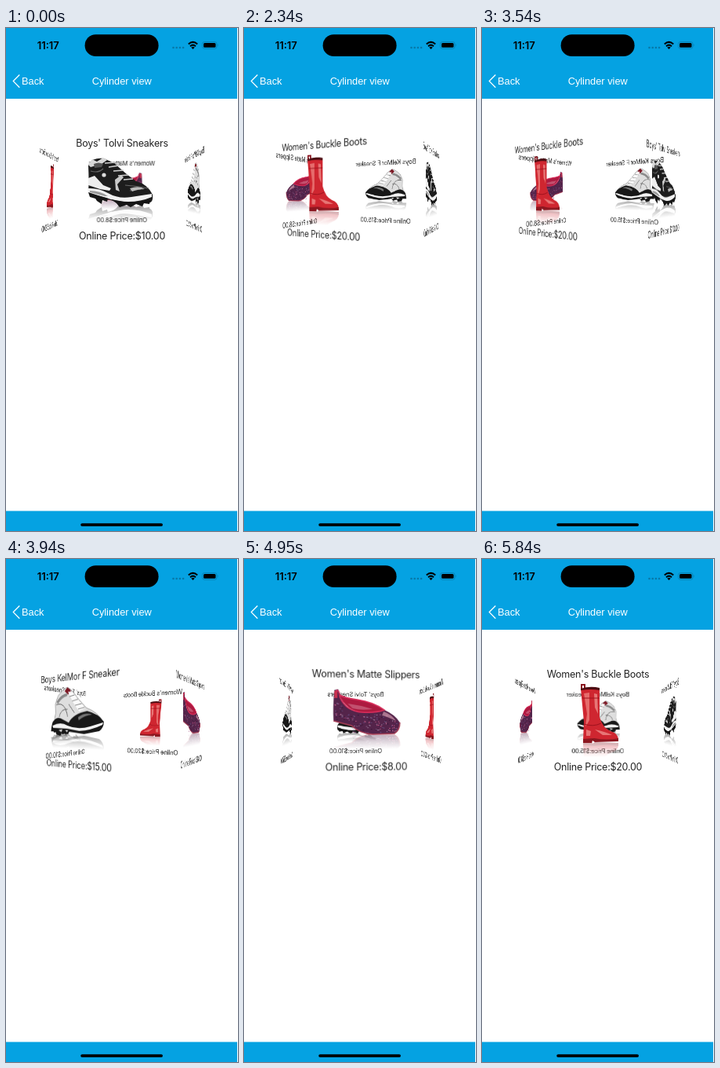
These frames come from a looping animation (296x640 px, 5880 ms). An HTML page:

```html
<!DOCTYPE html>
<html lang="en">
<head>
<meta charset="utf-8">
<title>Cylinder view</title>
<style>
  html, body { margin: 0; width: 100%; height: 100%; overflow: hidden; background: #fff; }
  #stage { position: absolute; left: 0; top: 0; width: 296px; height: 640px; overflow: hidden; }
  #chrome { position: absolute; left: 0; top: 0; }
  #scene { position: absolute; inset: 0; perspective: 376px; perspective-origin: 147.7px 212.6px; }
  #drum { position: absolute; left: 147.7px; top: 212.6px; width: 0; height: 0; transform-style: preserve-3d; }
  #drum svg { position: absolute; left: -80px; top: -80px; transform-origin: 80px 80px; overflow: visible; }
  .label { font: 12.5px Inter, "Liberation Sans", sans-serif; letter-spacing: -.25px; fill: #222; text-anchor: middle; }
  .nav { font: 12.8px "Liberation Sans", Arial, sans-serif; fill: #fff; }
  .clock { font: 600 13px Inter, "Liberation Sans", sans-serif; }
</style>
</head>
<body>
<div id="stage">
  <svg id="chrome" width="296" height="640" viewBox="0 0 296 640">
    <rect width="295" height="90" fill="#05a2e2"/>
    <rect y="614.500" width="295" height="25.500" fill="#05a2e2"/>
    <rect x="100.600" y="8.300" width="94" height="27.800" rx="13.900"/>
    <rect x="95.200" y="630.200" width="104.800" height="3.800" rx="1.900"/>
    <text class="clock" x="53.800" y="26.700" text-anchor="middle">11:17</text>
    <g fill="#0878a8">
      <circle cx="213.500" cy="25" r="1.300"/><circle cx="217.700" cy="25" r="1.300"/>
      <circle cx="221.900" cy="25" r="1.300"/><circle cx="226.100" cy="25" r="1.300"/>
    </g>
    <path d="M232.800 20.500Q238.500 15.300 244.200 20.500M235 23.200Q238.500 20 242 23.200" fill="none" stroke="#000" stroke-width="2"/>
    <path d="M236.300 24.700Q238.500 23 240.700 24.700L238.500 27Z"/>
    <rect x="250.500" y="17.500" width="18.500" height="8.800" rx="2.800" fill="none" stroke="#0585b8"/>
    <rect x="252" y="19" width="15.500" height="5.800" rx="1.500"/>
    <path d="M270.200 20.300Q271.800 21.900 270.200 23.500Z" fill="#0585b8"/>
    <path d="M17.300 59.500L9.300 67.600L17.300 75.700" fill="none" stroke="#fff" stroke-width="1.300"/>
    <text class="nav" x="20" y="71.700">Back</text>
    <text class="nav" x="147.700" y="71.700" text-anchor="middle">Cylinder view</text>
  </svg>
  <div id="scene"><div id="drum"></div></div>
</div>
<script>
const LOOP = 5880, RADIUS = 120;

const shape = (fill, d, extra = '') => `<path d="${d}" fill="${fill}" ${extra}/>`;
const line = (color, width, d) => shape('none', d, `stroke="${color}" stroke-width="${width}"`);

function random(seed) {
  return () => (seed = seed * 16807 % 2147483647) / 2147483647;
}

function glitter() {
  const rnd = random(77), colors = ['#d0608e', '#6d5a92', '#2a1230', '#a58aa8'];
  let dots = '';
  for (let i = 0; i < 150; i++) {
    const x = -40 + rnd() * 79;
    const low = x < -18 ? -5 + x / 10 : 8;
    const high = x < -30 ? -30 : x < 22 ? -15 : -17 + (x - 22) * .7;
    const y = high + rnd() * (low - high);
    dots += `<circle cx="${x.toFixed(1)}" cy="${y.toFixed(1)}" r=".65" fill="${colors[i % 4]}"/>`;
  }
  return dots;
}

const blackShoe =
  shape('#1d1d1d', 'M-43-38L-38-45Q-30-48-23-47L-10-41L6-27L18-18Q33-14 39-1Q40 7 36 9L4 11Q-18 6-43-4Q-42-18-43-38Z') +
  shape('#d8d8d8', 'M-43-39L-38-46L-32-43L-24-48L-19-45L-26-40L-40-36Z') +
  shape('#555', 'M-36-40Q-30-43-24-40L-26-36L-35-35Z') +
  shape('#eee', 'M-43-22L-35-25L-24-13L-14-9L-16-6L-28-8L-43-13Z') +
  shape('#f2f2f2', 'M-44-9Q-30-10-18-3Q-4 5 12 2L38-2L38 2Q24 8 8 8Q-8 8-20 3L-43-3Z') +
  shape('#999', 'M-41-6Q-28-6-18 1L-22 1L-41-4Z') +
  shape('#c9c9c9', 'M-9-20L-1-26L2-23L-6-14L-3-5L-8-7Z') +
  line('#d0d0d0', 1.6, 'M-22-41L-9-42M-17-36L-4-38M-11-31L2-32M-5-25L8-26M2-20L14-21') +
  line('#666', 1.2, 'M-40-31Q-30-28-24-34M4-13Q18-12 34-9M10-6L24-8') +
  '<circle cx="-23" cy="-26" r="2.600" fill="#ddd"/>' +
  shape('#bbb', 'M10-9Q22-13 29-8Q20-8 13-5Z') +
  shape('#151515', 'M-43-4L-18 4L-19 8L-25 6L-26 11L-32 7L-34 4L-41 2ZM-14 5L8 9L36 6L35 11L28 10L26 14L18 11L11 15L6 12L-3 15L-7 10Z');

const slipper =
  shape('#54244a', 'M-41-46L-36-47L-34-37Q-26-19-6-18Q12-17 23-21Q37-15 43-5Q43 5 36 9L8 10Q-9 9-19-1L-42-7Q-43-24-41-46Z') +
  glitter() +
  shape('#ad1a40', 'M-35-40Q-28-36-12-34Q9-31 23-21Q10-16-6-18Q-26-20-35-40Z') +
  shape('#d8879d', 'M-24-29Q-8-27 8-22Q-8-20-18-23Z', 'opacity=".5"') +
  shape('#e8afc0', 'M22-19Q33-15 38-7Q28-12 20-14Z', 'opacity=".6"') +
  line('#d92d5b', 1.5, 'M-39-45Q-35-48-34-37Q-26-19-6-18Q12-17 23-21Q9-31-12-34Q-28-36-35-40') +
  line('#c8314f', 4, 'M-39-45L-39-36') +
  line('#a13a52', 1.5, 'M-42-7L-19-1Q-9 9 8 10L36 9Q43 5 43-5');

const boot =
  shape('#cf2630', 'M-22-48L2-48L2-12Q6 2 16 6Q26 9 26 17L-19 18L-18-6Z') +
  line('#8b1620', 2, 'M-21-48L-21-53L-17-53L-17-47') +
  shape('#4c0d12', 'M-22-48Q-10-52 2-49L2-46Q-9-48-22-46Z') +
  shape('#f08a86', 'M-18-42L-11-43L-11-8Q-14-2-16 0L-14-16Z', 'opacity=".7"') +
  shape('#f5a29c', 'M-5-42L-1-41L0-16L-4-24ZM-4 4Q10 7 18 11L6 11ZM-15 4L-9 6L-10 12L-15 12Z', 'opacity=".65"') +
  line('#9e121d', 1, 'M-18-3Q-6 1 4-4M-20-36L2-36') +
  shape('#8c1720', 'M-19 16L-5 15Q12 18 26 15L26 19L-4 20L-7 18L-8 21L-19 21Z');

const whiteShoe =
  shape('#dedede', 'M-40-6Q-36-18-38-31L-33-42Q-24-51-16-53L-7-47L4-35L16-24Q34-18 42-6L40 2L0 6L-42 0Z', 'stroke="#888" stroke-width=".8"') +
  shape('#7c1723', 'M-21-48L-16-53L-10-48L-15-43Z') +
  shape('#8a8a8a', 'M-36-34Q-26-45-16-45L-17-41Q-26-40-33-31Z') +
  shape('#fafafa', 'M-15-47L-8-46L14-24L4-20Q-8-32-15-47Z') +
  line('#888', 1.2, 'M-13-40L-4-42M-8-34L2-36M-3-28L8-30M2-23L13-25') +
  line('#555', 1, 'M-36-30Q-20-34-16-13M-31-13Q-27-25-16-23M-14-30L-4-18') +
  shape('#181818', 'M-44-4Q-38-14-28-11L-14-5Q-6-17 17-20Q35-16 43-6Q43 2 36 6L12 10L-15 7L-18 11L-26 9L-29 13L-36 11L-38 7L-46 7Z') +
  shape('#f3f3f3', 'M-43-1Q-28-7-16-1Q2 5 22 0L42-5L41-2Q24 5 4 6L-17 3L-42 2Z') +
  shape('#ddd', 'M-32 5L-25 4L-27 8ZM-20 5L-15 5L-17 8Z') +
  shape('#777', 'M2-12Q14-19 25-15Q14-15 3-8Z');

const items = [
  { name: "Boys' Tolvi Sneakers", price: '10.00', art: blackShoe, floor: 13, angle: 0 },
  { name: 'Boys KelMor F Sneaker', price: '15.00', art: whiteShoe, floor: 11, angle: 90 },
  { name: "Women's Matte Slippers", price: '8.00', art: slipper, floor: 10, angle: 180 },
  { name: "Women's Buckle Boots", price: '20.00', art: boot, floor: 20, angle: 270 }
];

function face({ name, price, art, floor, angle }, i) {
  return `<svg width="160" height="150" viewBox="-80 -80 160 150"
    style="transform: rotateY(${angle}deg) translateZ(${RADIUS}px)">
    <defs>
      <linearGradient id="fade${i}" gradientUnits="userSpaceOnUse" x1="0" x2="0" y1="${floor - 4}" y2="${floor + 19}">
        <stop offset="0" stop-color="#fff" stop-opacity=".45"/>
        <stop offset="1" stop-color="#fff" stop-opacity="0"/>
      </linearGradient>
      <mask id="mirror${i}" maskUnits="userSpaceOnUse" x="-80" y="${floor - 20}" width="160" height="42">
        <rect x="-80" y="${floor - 20}" width="160" height="42" fill="url(#fade${i})"/>
      </mask>
    </defs>
    <g mask="url(#mirror${i})"><g transform="translate(0 ${2 * floor}) scale(1 -1)">${art}</g></g>
    ${art}
    <text class="label" y="-62">${name}</text>
    <text class="label" y="55.800">Online Price:$${price}</text>
  </svg>`;
}

// Each swipe is a short drag followed by a quadratic slow-down.
const part = (t, start, span) => Math.min(1, Math.max(0, (t - start) / span));
const glide = (t, start, span) => 1 - (1 - part(t, start, span)) ** 2;

function spin(t) {
  if (t < 1790) return 0;
  if (t < 3180) return 24.5 + 425.5 * glide(t, 1790, 726);
  if (t < 4950) return 449 - 60 * part(t, 3180, 433) ** 2.5 - 209 * glide(t, 3613, 704);
  return 184 + 32 * part(t, 4950, 110) + 234 * glide(t, 5060, 740);
}

const ticks = [
  0, 1790, 1900, 2010, 2120, 2230, 2340, 2460, 2560,
  3180, 3320, 3420, 3530, 3630, 3740, 3840, 3940, 4040, 4150, 4250, 4360,
  4950, 5060, 5170, 5290, 5400, 5510, 5620, 5730, 5840
];

const pose = t => ({
  offset: t / LOOP,
  easing: 'steps(1, end)',
  transform: `translateZ(${-RADIUS}px) rotateY(${spin(t).toFixed(2)}deg)`
});

const drum = document.getElementById('drum');
drum.innerHTML = items.map(face).join('');
drum.animate([...ticks, LOOP].map(pose), { duration: LOOP, iterations: Infinity });
</script>
</body>
</html>
```
